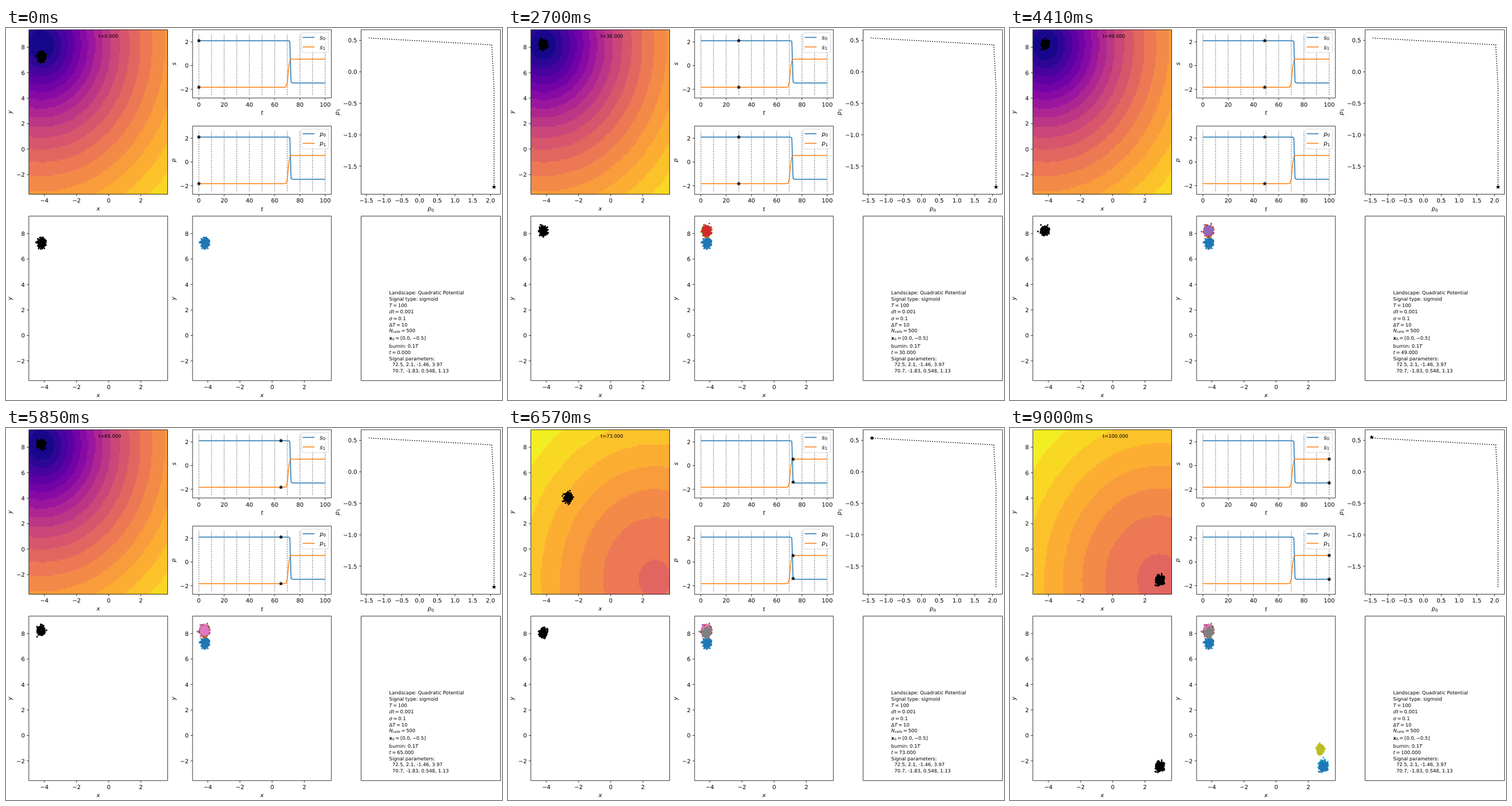
Recreate the animation shown at these times as an HTML page with a canvas. Size 864 by 648 pixels, loop 9.09 s.

```html
<!DOCTYPE html>
<html lang="en">
<head>
<meta charset="utf-8">
<title>Quadratic potential</title>
<style>
html, body { margin: 0; width: 100%; height: 100%; overflow: hidden; background: #fff; }
canvas, svg { position: absolute; left: 0; top: 0; width: 864px; height: 648px; }
text { font-family: "DejaVu Sans", sans-serif; font-size: 10px; text-rendering: geometricPrecision; }
.small, .small text { font-size: 8.33px; }
.i { font-style: italic; }
.b { font-weight: bold; }
.line { fill: none; stroke-width: 1.5; stroke-linejoin: round; }
.axis { fill: none; stroke: #000; stroke-width: .8; }
.mark { stroke: #000; stroke-width: .8; }
</style>
</head>
<body>
<canvas id="cv" width="864" height="648"></canvas>
<svg id="fig" viewBox="0 0 864 648"></svg>
<script>
const STEP = 90, STEPS = 101, CELLS = 500;
const TAB = ['#1f77b4', '#ff7f0e', '#2ca02c', '#d62728', '#9467bd',
             '#8c564b', '#e377c2', '#7f7f7f', '#bcbd22', '#17becf'];
const fig = document.getElementById('fig');
const ctx = document.getElementById('cv').getContext('2d');

// Signals
const sigmoid = (t, tc, a, b, r) => a + (b - a) * (1 + Math.tanh(r * (t - tc))) / 2;
const sig0 = t => sigmoid(t, 72.5, 2.1, -1.46, 3.97);
const sig1 = t => sigmoid(t, 70.7, -1.83, 0.548, 1.13);
const times = Array.from({ length: STEPS }, (_, k) => k);

// SVG helpers
function add(tag, attrs, html = '', parent = fig) {
  const el = document.createElementNS('http://www.w3.org/2000/svg', tag);
  for (const name in attrs) el.setAttribute(name, attrs[name]);
  el.innerHTML = html;
  return parent.appendChild(el);
}
const label = (x, y, html, anchor = 'middle', cls = '') =>
  add('text', { x, y, 'text-anchor': anchor, class: cls }, html);
const it = s => `<tspan class="i">${s}</tspan>`;
const sub = (s, size, cls = '') =>
  `<tspan dy="1.4" font-size="${size}" style="font-size:${size}px" class="${cls}">${s}</tspan>` +
  '<tspan dy="-1.4">\u200b</tspan>';
const eq = '\u2009=\u2009';
const num = (v, d) => v.toFixed(d).replace('-', '\u2212');

// A panel: box, linear scales, ticks and axis names
function panel({ box: [l, t, r, b], x, y, xt = [], yt = [], xd = 0, yd = 0 }) {
  const px = v => x[0] + x[1] * v, py = v => y[0] - y[1] * v;
  let d = `M${l} ${t}H${r}V${b}H${l}Z`;
  for (const v of xt) {
    d += `M${px(v)} ${b}v3.5`;
    label(px(v), b + 14.6, num(v, xd));
  }
  for (const v of yt) {
    d += `M${l} ${py(v)}h-3.5`;
    label(l - 7, py(v) + 3.8, num(v, yd), 'end');
  }
  return { px, py, box: [l, t, r, b], frame: () => add('path', { d, class: 'axis' }) };
}
function names(p, xn, yn, yx) {
  const [l, t, r, b] = p.box, cy = (t + b) / 2;
  label((l + r) / 2, b + 28.8, xn);
  add('text', { transform: `translate(${yx} ${cy}) rotate(-90)`, 'text-anchor': 'middle' }, yn);
}
const trace = (p, fx, fy) =>
  'M' + times.map(t => `${p.px(fx(t)).toFixed(2)} ${p.py(fy(t)).toFixed(2)}`).join('L');

// Plane panels
const X = [-4, -2, 0, 2], Y = [-2, 0, 2, 4, 6, 8];
const land = panel({ box: [39.8, 3, 281.6, 289.6], x: [178.9, 28.02], y: [211, 22.18], xt: X, yt: Y });
const snap = panel({ box: [39.8, 327.7, 281.6, 614.2], x: [178.9, 28.02], y: [535.5, 22.18], xt: X, yt: Y });
const hist = panel({ box: [325, 327.7, 566.8, 614.2], x: [463.6, 28.02], y: [535.5, 22.18], xt: X, yt: Y });
for (const [p, yx] of [[land, 9.5], [snap, 9.5], [hist, 294.5]]) {
  names(p, it('x'), it('y'), yx);
  p.frame();
}

// Signal panels
const stars = [];
function star() {
  const pts = [];
  for (let i = 0; i < 10; i++) {
    const r = i % 2 ? 1.25 : 3.25, a = i * Math.PI / 5;
    pts.push(`${(r * Math.sin(a)).toFixed(2)},${(-r * Math.cos(a)).toFixed(2)}`);
  }
  return add('polygon', { points: pts.join(' '), class: 'mark' });
}
const time = t => t;
function signalPanel(top, name, yx) {
  const p = panel({
    box: [325, top, 566.8, top + 118.9], x: [336, 2.2], y: [top + 62.5, 20.65],
    xt: [0, 20, 40, 60, 80, 100], yt: [-2, 0, 2]
  });
  names(p, it('t'), it(name), yx);
  let d = '';
  for (let t = 0; t <= 100; t += 10) d += `M${p.px(t)} ${top + 113.5}V${top + 8}`;
  add('path', { d, stroke: '#777', 'stroke-width': 1, 'stroke-dasharray': '2.4 1.6' });
  [sig0, sig1].forEach((f, i) =>
    add('path', { d: trace(p, time, f), class: 'line', stroke: TAB[i] }));
  p.frame();
  add('rect', { x: 514.8, y: top + 5.2, width: 47, height: 34.6, rx: 2,
    fill: '#fff', 'fill-opacity': .8, stroke: '#ccc', 'stroke-opacity': .8 });
  [0, 1].forEach(i => {
    const y = top + 13.4 + 16.6 * i;
    add('path', { d: `M517 ${y}h20.5`, class: 'line', stroke: TAB[i] });
    label(546.5, y + 3.5, it(name) + sub(i, 7), 'start');
  });
  [sig0, sig1].forEach(f => stars.push({ el: star(), p, fx: time, fy: f }));
}
signalPanel(3, 's', 296);
signalPanel(170.9, 'p', 295);

// Parameter path
const path = panel({
  box: [618.6, 3, 861.4, 289.6], x: [720.3, 61.85], y: [76.3, 109.7],
  xt: [-1.5, -1, -.5, 0, .5, 1, 1.5, 2], yt: [-1.5, -1, -.5, 0, .5], xd: 1, yd: 1
});
names(path, it('p') + sub(0, 7), it('p') + sub(1, 7), 579.5);
add('path', { d: trace(path, sig0, sig1), class: 'line', stroke: '#000', 'stroke-dasharray': '1.5 2.475' });
path.frame();
stars.push({ el: star(), p: path, fx: sig0, fy: sig1 });

// Info panel
panel({ box: [618.6, 327.7, 861.4, 614.2], x: [0, 1], y: [0, 1] }).frame();
const info = [
  [464, 'Landscape: Quadratic Potential'],
  [474.7, 'Signal type: sigmoid'],
  [485.5, it('T') + eq + '100'],
  [497, it('dt') + eq + '0.001'],
  [508.5, it('σ') + eq + '0.1'],
  [519.6, 'Δ' + it('T') + eq + '10'],
  [530, it('N') + sub('cells', 5.83, 'i') + eq + '500'],
  [543, '<tspan class="b">x</tspan>' + sub('0', 5.83) + eq + '[0.0,\u2009\u22120.5]'],
  [556.5, 'burnin: 0.1' + it('T')],
  [567.6, ''],
  [578.5, 'Signal parameters:'],
  [589, '72.5, 2.1, -1.46, 3.97', 5.3],
  [600, '70.7, -1.83, 0.548, 1.13', 5.3]
].map(([y, s, dx = 0]) => label(667.6 + dx, y, s, 'start', 'small'));
const clock = info[9];
const title = label(161.2, 17.3, '', 'start', 'small');

// Seeded normal noise
let seed = 20240;
function rand() {
  seed = (seed + 0x6D2B79F5) | 0;
  let z = Math.imul(seed ^ seed >>> 15, 1 | seed);
  z = z + Math.imul(z ^ z >>> 7, 61 | z) ^ z;
  return ((z ^ z >>> 14) >>> 0) / 4294967296;
}
const gauss = () => Math.sqrt(-2 * Math.log(1 - rand())) * Math.cos(2 * Math.PI * rand());

// Cells: drift of the mean plus a stationary random walk around it
const KX = 1 / 2, KY = 2 / 9, SIGMA = .1;
const clouds = (() => {
  const dt = .005, out = [];
  const sx = SIGMA / Math.sqrt(2 * KX), sy = SIGMA / Math.sqrt(2 * KY);
  const ax = Math.exp(-KX), ay = Math.exp(-KY);
  const walk = (v, a, s) => a * v + s * Math.sqrt(1 - a * a) * gauss();
  let mx = 0, my = -.5;
  const drift = (from, to) => {
    for (let i = 0, n = Math.round((to - from) / dt); i < n; i++) {
      const t = from + i * dt;
      mx -= (KX * mx + sig0(t)) * dt;
      my -= (KY * my + sig1(t)) * dt;
    }
  };
  drift(-10, 0);
  let noise = Array.from({ length: CELLS }, () => [sx * gauss(), sy * gauss()]);
  for (let k = 0; k < STEPS; k++) {
    out.push(noise.map(([x, y]) => [mx + x, my + y]));
    noise = noise.map(([x, y]) => [walk(x, ax, sx), walk(y, ay, sy)]);
    drift(k, k + 1);
  }
  return out;
})();

function dots(p, cloud, color) {
  ctx.fillStyle = color;
  ctx.beginPath();
  for (const [x, y] of cloud) {
    const cx = p.px(x), cy = p.py(y);
    ctx.moveTo(cx + 1.5, cy);
    ctx.arc(cx, cy, 1.5, 0, 7);
  }
  ctx.fill();
}

// Landscape in log scale, in colour bands
const PLASMA = ['0d0887', '41049d', '6a00a8', '8f0da4', 'b12a90', 'cc4778',
                'e16462', 'f2844b', 'fca636', 'fcce25', 'f0f921']
  .map(h => [0, 2, 4].map(i => parseInt(h.slice(i, i + 2), 16)));
function plasma(u) {
  const i = Math.min(9, Math.floor(u * 10)), f = u * 10 - i;
  return PLASMA[i].map((c, j) => c + (PLASMA[i + 1][j] - c) * f);
}
const EDGES = [0, .04, .085, .14, .195, .25, .305, .36, .415, .47, .525, .58,
               .635, .69, .745, .795, .845, .895, .95, 1];
const BANDS = EDGES.slice(1).map((e, i) => plasma((e + EDGES[i]) / 2));
const potential = (x, y, p, q) => x * x / 4 + y * y / 9 + p * x + q * y;
const X0 = -4.96, X1 = 3.66, Y0 = -3.54, Y1 = 9.38, GRID = 100;
const LOW = -(2.1 ** 2) - 2.25 * 1.83 ** 2;
const SPAN = Math.log(1 + potential(X0, Y1, -1.46, .548) - LOW);
const heat = document.createElement('canvas');
heat.width = heat.height = GRID;
const hctx = heat.getContext('2d'), pix = hctx.createImageData(GRID, GRID);

function paintHeat(t) {
  const p = sig0(t), q = sig1(t);
  for (let j = 0, o = 0; j < GRID; j++) {
    const y = Y1 + (Y0 - Y1) * j / (GRID - 1);
    for (let i = 0; i < GRID; i++, o += 4) {
      const v = potential(X0 + (X1 - X0) * i / (GRID - 1), y, p, q);
      const u = Math.log(Math.max(1, 1 + v - LOW)) / SPAN;
      let n = 0;
      while (n < BANDS.length - 1 && u >= EDGES[n + 1]) n++;
      const c = BANDS[n];
      pix.data[o] = c[0];
      pix.data[o + 1] = c[1];
      pix.data[o + 2] = c[2];
      pix.data[o + 3] = 255;
    }
  }
  hctx.putImageData(pix, 0, 0);
  const [l, top, r, b] = land.box;
  ctx.imageSmoothingEnabled = false;
  ctx.drawImage(heat, l, top, r - l, b - top);
}

function draw(k) {
  ctx.clearRect(0, 0, 864, 648);
  paintHeat(k);
  dots(land, clouds[k], '#000');
  const last = Math.floor(k / 10);
  dots(snap, clouds[last * 10], '#000');
  for (let i = 0; i <= last; i++) dots(hist, clouds[i * 10], TAB[i % 10]);
  for (const { el, p, fx, fy } of stars)
    el.setAttribute('transform', `translate(${p.px(fx(k))} ${p.py(fy(k))})`);
  title.textContent = 't=' + k.toFixed(3);
  clock.innerHTML = it('t') + eq + k.toFixed(3);
}

let shown = -1;
function tick() {
  const k = Math.floor(performance.now() / STEP) % STEPS;
  if (k !== shown) draw(shown = k);
  requestAnimationFrame(tick);
}
tick();
</script>
</body>
</html>
```
